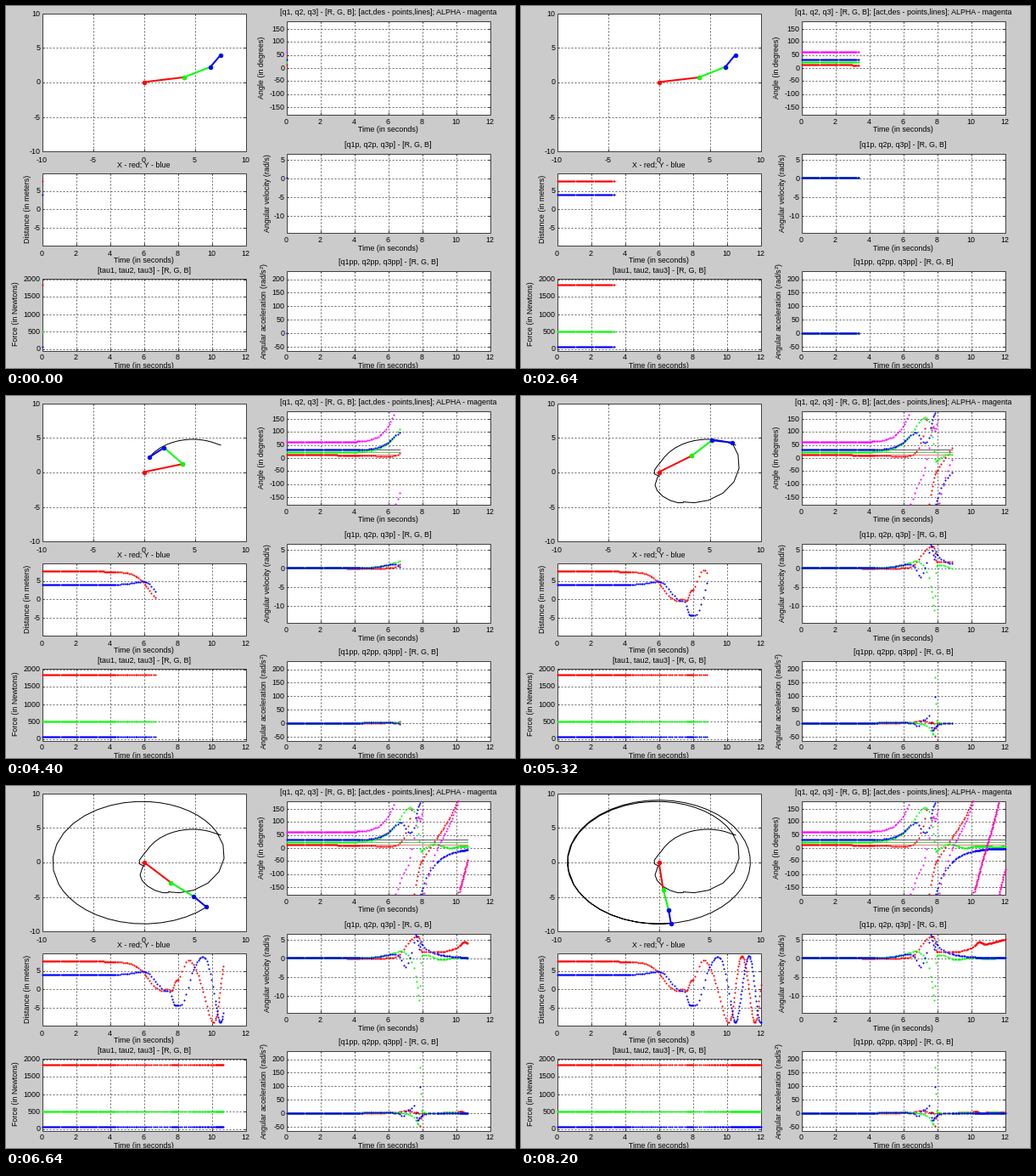
Animation, 600 px wide and 426 px high, one loop 8.24 s. Source, as a matplotlib script:

```python
import numpy as np
import matplotlib.pyplot as plt
from matplotlib.animation import FuncAnimation
from matplotlib.collections import LineCollection
from matplotlib.patches import Rectangle

W, H, DPI = 600, 426, 100
FRAMES, STEP = 206, 40
PX = 72 / DPI
RED, GREEN, BLUE, MAGENTA = "#ff0000", "#00ff00", "#0000ff", "#ff00ff"
RGB = (RED, GREEN, BLUE)
START = (10, 20, 30)
LINKS = (4, 3, 2)
TORQUES = (1840, 490, 49)
SNAP = 7.86  # moment the folded arm whips straight

plt.rcParams["font.family"] = "Liberation Sans"
plt.rcParams["font.size"] = 8.85 * PX
plt.rcParams["mathtext.default"] = "regular"


def turn(t, size, centre, width, sharp=1):
    """Exponential onset that levels off at size; sharp hardens the stop."""
    return size * np.exp(-np.logaddexp(0, -sharp * (t - centre) / width) / sharp)


def speed_up(t, rate, centre, width):
    """Smooth change of speed by rate."""
    return rate * width * np.logaddexp(0, (t - centre) / width)


def pose(t):
    """Joint angles in degrees, each relative to the previous link."""
    after = np.maximum(t - SNAP, 0)
    spin = np.maximum(t - 9.3, 0)
    ring = 1 - np.exp(-after / 1.35) * np.cos(2 * np.pi * after / 1.85)
    q1 = (START[0] + turn(t, -6, 5.1, .6) + speed_up(t, 342, 7, .2)
          + speed_up(t, -243, SNAP, .02) + 35 * spin ** 2
          + turn(t, 33, 10.45, .12))
    q2 = (START[1] + turn(t, 165, 7.05, .7, 3)
          + turn(t, -199, SNAP, .22, 12) + 18 * ring)
    q3 = (START[2] + turn(t, 100, 6.35, .42) + turn(t, -70, 7, .1)
          + turn(t, 120, 7.62, .085) + 178 * (1 - np.exp(-after / .85)))
    return np.array([q1, q2, q3])


def wrap(deg):
    return (deg + 180) % 360 - 180


# simulated time: even steps, slowed by the snap and the final spin
time = np.interp(np.arange(FRAMES), (2, 86, 107, 118, 126, 133, 152, 205),
                 (0, 4.4, 6.33, 7.62, 8, 8.85, 10.2, 12))
h = .03
before, angles, later = pose(time - h), pose(time), pose(time + h)
speeds = np.radians(later - before) / (2 * h)
accels = np.radians(later - 2 * angles + before) / h ** 2

heading = np.radians(np.cumsum(angles, axis=0))
reach = np.array(LINKS)[:, None]
zero = np.zeros((1, FRAMES))
arm_x = np.vstack([zero, np.cumsum(reach * np.cos(heading), axis=0)])
arm_y = np.vstack([zero, np.cumsum(reach * np.sin(heading), axis=0)])

fig = plt.figure(figsize=(W / DPI, H / DPI), dpi=DPI, facecolor="#cbcbcb")
ax = fig.add_axes([0, 0, 1, 1])
ax.set_xlim(-.5, W - .5)
ax.set_ylim(H - .5, -.5)
ax.axis("off")


def label(x, y, s, ha="center"):
    ax.text(x, y + 3, s, ha=ha, va="baseline")


class Panel:
    def __init__(self, box, xlim, ylim, xticks, yticks, tick_gap=8.5):
        self.box, self.xlim, self.ylim = box, xlim, ylim
        left, top, right, bottom = box
        ax.add_patch(Rectangle((left, top), right - left, bottom - top,
                               fc="white", ec="none", zorder=0))
        grid, marks = [], []
        for v in xticks:
            x = round(self.x(v))
            label(x, bottom + tick_gap, f"{v}")
            if left < x < right:
                grid.append([(x, top), (x, bottom)])
                marks += [[(x, top), (x, top + 2.5)],
                          [(x, bottom), (x, bottom - 2.5)]]
        for v in yticks:
            y = round(self.y(v))
            label(left - 2, y, f"{v}", ha="right")
            if top < y < bottom:
                grid.append([(left, y), (right, y)])
                marks += [[(left, y), (left + 2.5, y)],
                          [(right, y), (right - 2.5, y)]]
        ax.add_collection(LineCollection(grid, colors="#6a6a6a", linewidths=PX,
                                         linestyles=[(0, (2, 2))], zorder=1))
        ax.add_collection(LineCollection(marks, colors="#303030",
                                         linewidths=PX, zorder=1))
        ax.add_patch(Rectangle((left, top), right - left, bottom - top,
                               fc="none", ec="#404040", lw=PX, zorder=1.5))

    def x(self, v):
        (a, b), (left, _, right, _) = self.xlim, self.box
        return left + (v - a) / (b - a) * (right - left)

    def y(self, v):
        (a, b), (_, top, _, bottom) = self.ylim, self.box
        return bottom - (v - a) / (b - a) * (bottom - top)


def time_panel(box, ylim, yticks, title, title_y, ylabel, ylabel_at, gaps):
    p = Panel(box, (0, 12), ylim, range(0, 13, 2), yticks, gaps[0])
    mid = (box[0] + box[2]) / 2
    label(mid, title_y, title)
    label(mid, box[3] + gaps[1], "Time (in seconds)")
    ax.text(*ylabel_at, ylabel, rotation=90, ha="center", va="center")
    return p


plane = Panel((42, 8, 282, 170), (-10, 10), (-10, 10),
              range(-10, 11, 5), range(-10, 11, 5), 10)
dist = time_panel((42, 196, 282, 281), (-9.8, 9.8), (-5, 0, 5),
                  "X - red; Y - blue", 186.5,
                  "Distance (in meters)", (25, 238), (9, 17))
force = time_panel((42, 320, 282, 405), (-60, 2020), range(0, 2001, 500),
                   "[tau1, tau2, tau3] - [R, G, B]", 310,
                   "Force (in Newtons)", (11.5, 362), (8, 17))
angle = time_panel((330, 17, 570, 127), (-180, 180), range(-150, 151, 50),
                   "[q1, q2, q3] - [R, G, B]; [act,des - points,lines];"
                   " ALPHA - magenta", 7,
                   "Angle (in degrees)", (301.5, 72), (8.5, 18))
speed = time_panel((330, 173, 570, 266), (-14.6, 6.6), (-10, -5, 0, 5),
                   "[q1p, q2p, q3p] - [R, G, B]", 163,
                   "Angular velocity (rad/s)", (308, 220), (9, 18.5))
accel = time_panel((330, 311, 570, 405), (-66, 230), range(-50, 201, 50),
                   "[q1pp, q2pp, q3pp] - [R, G, B]", 301,
                   "Angular acceleration (rad/s$^2$)", (304.5, 358), (8, 17))

trails = []


def trail(xs, ys, **style):
    line, = ax.plot([], [], **style)
    trails.append((line, xs, ys))


def series(panel, values, color):
    trail(panel.x(time), panel.y(values), color=color, ls="none", marker="o",
          ms=2.1 * PX, mew=0, zorder=3)


# desired angles as thin lines
for goal, color in zip(START, ("#e08080", "#60d060", "#606068")):
    trail(angle.x(time), angle.y(np.full(FRAMES, goal)), color=color,
          lw=PX, zorder=2)

series(dist, arm_x[3], RED)
series(dist, arm_y[3], BLUE)
for k, color in enumerate(RGB):
    series(force, np.full(FRAMES, TORQUES[k]), color)
    series(angle, wrap(angles[k]), color)
    series(speed, speeds[k], color)
    series(accel, accels[k], color)
series(angle, wrap(angles.sum(axis=0)), MAGENTA)

px, py = plane.x(arm_x), plane.y(arm_y)
trail(px[3], py[3], color="black", lw=PX, zorder=2)
arm = [ax.plot([], [], color=c, lw=2 * PX, marker="o", ms=4.4 * PX,
               mew=PX, zorder=4)[0] for c in RGB]


def update(n):
    for line, xs, ys in trails:
        first = min(2, n)
        line.set_data(xs[first:n + 1], ys[first:n + 1])
    for k, link in enumerate(arm):
        link.set_data(px[k:k + 2, n], py[k:k + 2, n])
    return [t[0] for t in trails] + arm


anim = FuncAnimation(fig, update, frames=FRAMES, interval=STEP,
                     init_func=lambda: update(0), repeat=True,
                     repeat_delay=0, blit=False)
plt.show()
```
